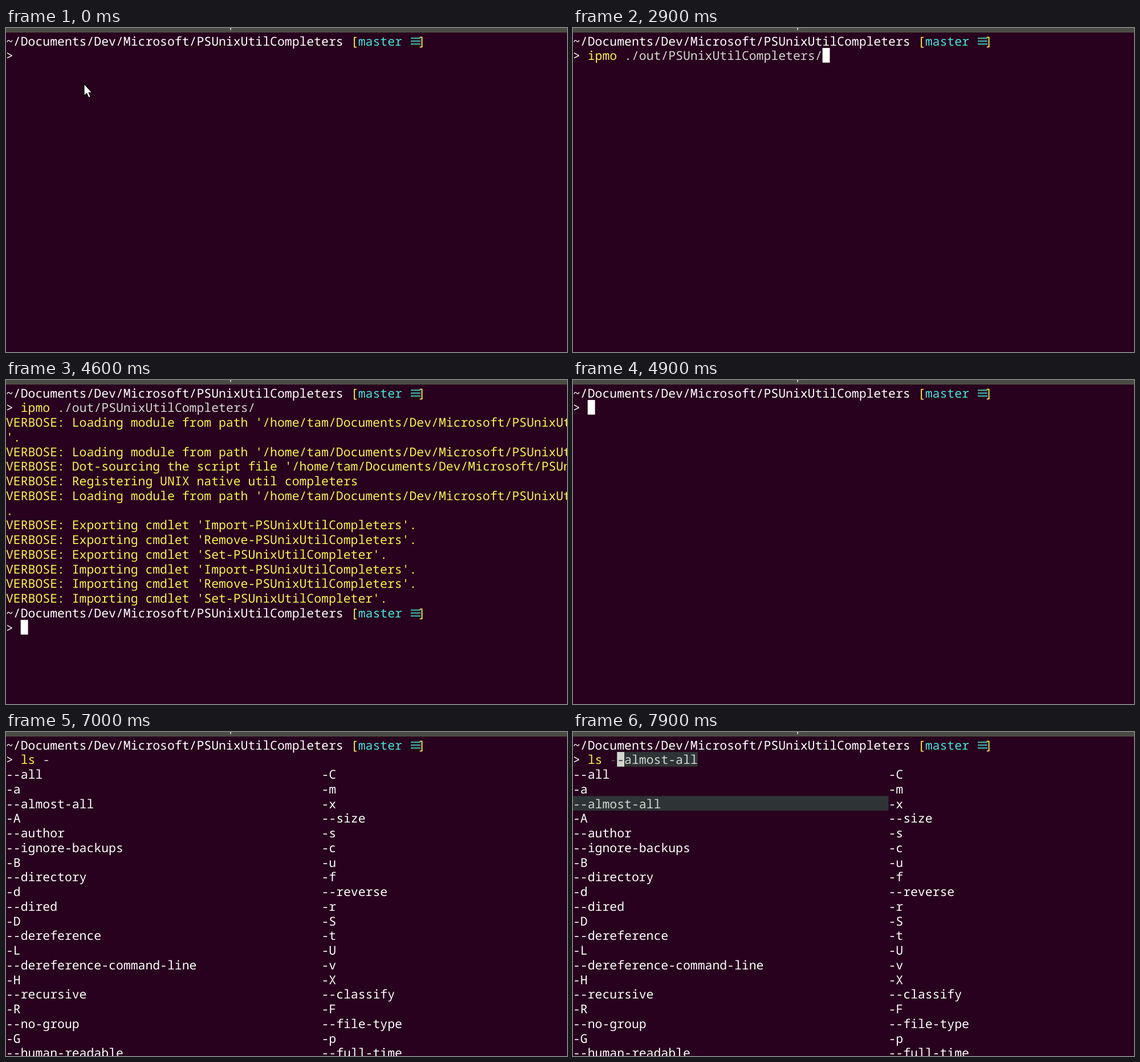
An HTML page for the animation above (8 s loop, 984 by 569 pixels).

```html
<!DOCTYPE html>
<html lang="en">
<head>
<meta charset="utf-8">
<title>Terminal</title>
<style>
html, body { margin: 0; width: 100%; height: 100%; overflow: hidden; background: #27011d; }
svg { display: block; width: 984px; height: 569px; }
text { font: 21.45px "Noto Sans Mono", "DejaVu Sans Mono", monospace; white-space: pre; text-rendering: geometricPrecision; }
</style>
</head>
<body>
<svg viewBox="0 0 984 569" xmlns="http://www.w3.org/2000/svg">
  <rect width="984" height="569" fill="#27011d"/>
  <rect width="984" height="8" fill="#4c4b43"/>
  <rect x="393" width="2" height="3.5" fill="#d0cfc8"/>
  <g id="screen"></g>
  <path id="arrow" d="M137 98V119L141.6 114.8L145 122.4L148.4 120.9L145.2 113.6H151Z" fill="#fff" stroke="#000" stroke-width="1.2"/>
  <path id="beam" d="M136.5 89.5H139L140 90.5L141 89.5H143.5M136.5 109.5H139L140 108.5L141 109.5H143.5M140 90.5V108.5" fill="none" stroke="#fff" stroke-width="1.6"/>
</svg>
<script>
const CW = 12.87, LH = 25.75, TOP = 9.3, BASE = 30.6;
const WHITE = '#fff', YELLOW = '#fbf04f', CYAN = '#48e4dc', GREY = '#d3d7cf', SLATE = '#2e3436', DIM = '#554a52';
const byId = id => document.getElementById(id);
const screen = byId('screen'), arrow = byId('arrow'), beam = byId('beam');

const DIR = 'Documents/Dev/Microsoft/PSUnixUtilCompleters';
const HOME = "'/home/tam/" + DIR;
const LOAD = 'Loading module from path ' + HOME;
const cmdlets = verb => ['Import-PSUnixUtilCompleters', 'Remove-PSUnixUtilCompleters', 'Set-PSUnixUtilCompleter']
  .map(name => `VERBOSE: ${verb} cmdlet '${name}'.`);
const LOG = [
  'VERBOSE: ' + LOAD, "'.", 'VERBOSE: ' + LOAD,
  'VERBOSE: Dot-sourcing the script file ' + HOME,
  'VERBOSE: Registering UNIX native util completers',
  'VERBOSE: ' + LOAD, '.',
  ...cmdlets('Exporting'), ...cmdlets('Importing')
];
const LEFT = ('--all -a --almost-all -A --author --ignore-backups -B --directory -d --dired -D --dereference -L ' +
  '--dereference-command-line -H --recursive -R --no-group -G --human-readable').split(' ');
const RIGHT = '-C -m -x --size -s -c -u -f --reverse -r -S -t -U -v -X --classify -F --file-type -p --full-time'.split(' ');

// Typed command line: start time, command, argument
const TYPED = [
  [0, ''], [700, 'i'], [900, 'im'], [1400, 'imp'], [1600, 'im'], [1900, 'ip'], [2000, 'ipmo'],
  [2400, 'ipmo', ' '], [2500, 'ipmo', ' .'], [2700, 'ipmo', ' ./'],
  [2900, 'ipmo', ' ./out/PSUnixUtilCompleters/'],
  [4900, ''], [5800, 'l'], [5900, 'ls'], [6100, 'ls', ' -']
];
const PICKS = [7400, 7600, 7900];

const esc = s => s.replace(/&/g, '&amp;').replace(/</g, '&lt;').replace(/>/g, '&gt;');
const put = (row, col, s, fill = WHITE) =>
  `<text x="${col * CW}" y="${BASE + row * LH}" fill="${fill}">${esc(s)}</text>`;
const box = (row, col, n, fill) =>
  `<rect x="${col * CW}" y="${TOP + row * LH}" width="${n * CW}" height="${LH}" fill="${fill}"/>`;
const cursor = (row, col) => box(row, col, 1, WHITE);

function prompt(row) {
  const bars = [17, 22.2, 27.4].map(y =>
    `<rect x="710" y="${y + row * LH}" width="17" height="1.6" fill="${CYAN}"/>`).join('');
  return put(row, 0, '~/' + DIR) + put(row, 47, '[', YELLOW) + put(row, 48, 'master', CYAN) +
    put(row, 56.15, ']', YELLOW) + bars + put(row + 1, 0, '>');
}

function menu(rows, pick) {
  let out = pick < 0 ? '' : box(pick + 2, 0, 43, SLATE);
  for (let i = 0; i < rows; i++) {
    out += put(i + 2, 0, LEFT[i], i === pick ? GREY : WHITE) + put(i + 2, 43, RIGHT[i]);
  }
  return out;
}

function choice(word) {
  const rest = word.slice(2);
  return put(1, 2, 'ls', YELLOW) + put(1, 5, '-', DIM) +
    box(1, 6, 1, GREY) + put(1, 6, word[1], SLATE) +
    (rest ? box(1, 7, rest.length, SLATE) + put(1, 7, rest, GREY) : '');
}

function draw(t) {
  const [, cmd, arg = ''] = TYPED.filter(k => k[0] <= t).pop();
  const pick = PICKS.filter(p => p <= t).length - 1;
  const logged = t >= 3700 && t < 4900;
  let out = prompt(0);

  if (pick >= 0) out += choice(LEFT[pick]);
  else {
    out += put(1, 2, cmd, YELLOW) + put(1, 2 + cmd.length, arg, GREY);
    if (t >= 700 && t < 6300 && !logged) out += cursor(1, 2 + cmd.length + arg.length);
  }
  if (logged) {
    out += LOG.map((s, i) => put(i + 2, 0, s, YELLOW)).join('') + prompt(15);
    if (t < 4000 || t >= 4600) out += cursor(16, 2);
  }
  if (t >= 6300) {
    const step = Math.floor((t - 6300) / 100) + 1;
    out += menu(Math.min(LEFT.length, Math.ceil(step * LEFT.length / 8)), pick);
  }
  screen.innerHTML = out;
  arrow.style.display = t < 400 ? '' : 'none';
  beam.style.display = t >= 400 && t < 700 ? '' : 'none';
}

const start = performance.now();
let last = -1;
function tick() {
  const t = Math.floor((performance.now() - start) % 8000 / 100) * 100;
  if (t !== last) draw(last = t);
  requestAnimationFrame(tick);
}
tick();
</script>
</body>
</html>
```
